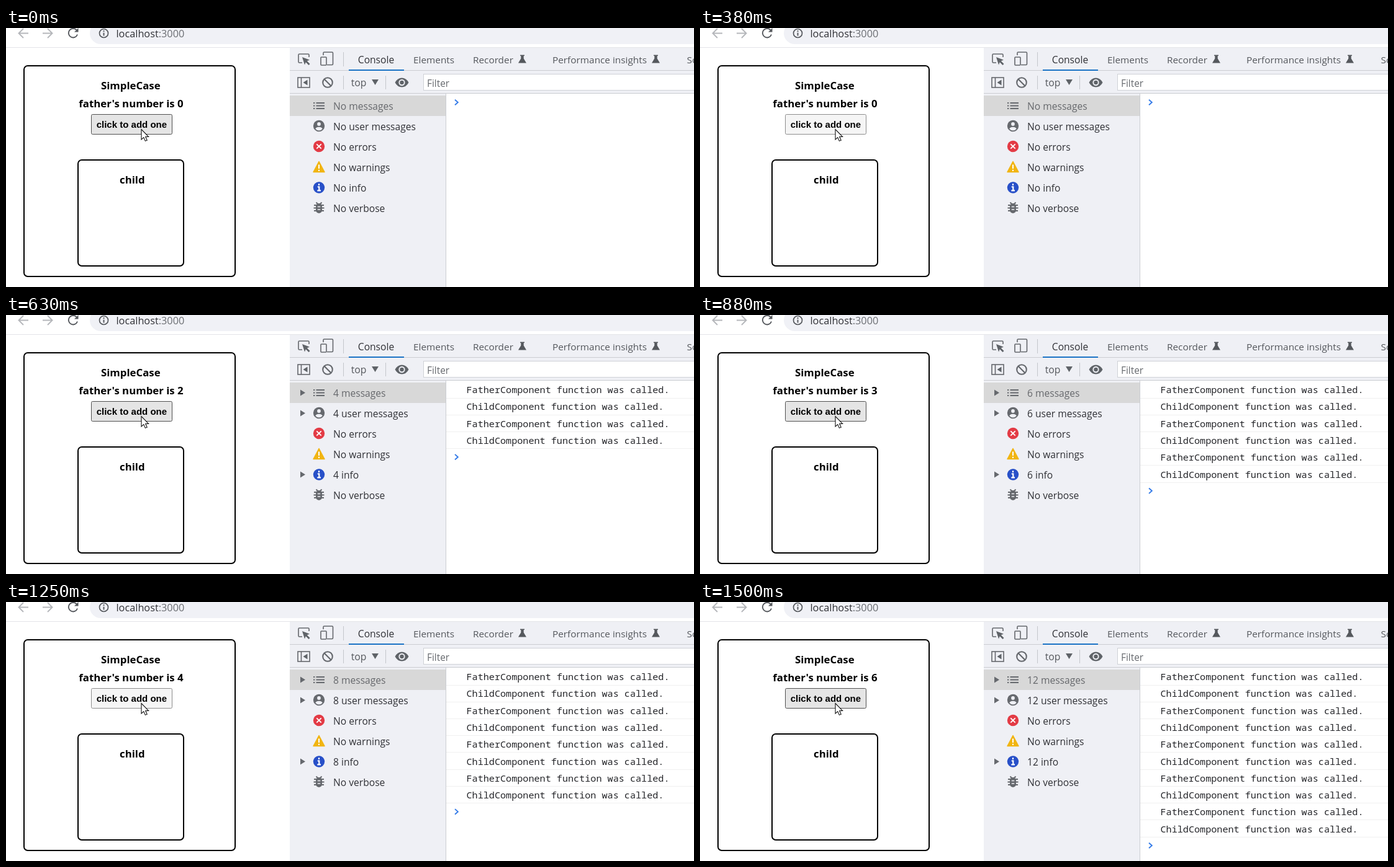
An HTML page for the animation above (1.62 s loop, 1108x418 px).

```html
<!DOCTYPE html>
<html lang="en">
<head>
<meta charset="utf-8">
<title>Click counter with console</title>
<style>
html, body { margin: 0; width: 100%; height: 100%; overflow: hidden; background: #fff; }
svg { display: block; }
text { font-family: "Open Sans", "Noto Sans", sans-serif; font-size: 15.6px; fill: #303136; white-space: pre; }
.tab { font-size: 15.35px; fill: #55585d; }
.bold { font-size: 16.8px; font-weight: 700; fill: #000; }
.mono { font-family: "Noto Sans Mono", "DejaVu Sans Mono", monospace; font-size: 15.15px; fill: #242529; }
.btn { font-family: "Liberation Sans", Arial, sans-serif; font-size: 15px; font-weight: 700; fill: #000; }
.line { fill: none; stroke: #64676c; stroke-width: 1.6; }
</style>
</head>
<body>
<svg width="1108" height="418" viewBox="0 0 1108 418">
  <!-- address bar -->
  <rect width="1108" height="418" fill="#fff"/>
  <rect x="135" y="-9" width="1010" height="35" rx="17.5" fill="#f0f1f6"/>
  <g fill="none" stroke-width="1.9">
    <path d="M36 8.5H21M28 1L20.500 8.500L28 16" stroke="#b5b7bb"/>
    <path d="M59 8.500H74M67 1L74.500 8.500L67 16" stroke="#b5b7bb"/>
    <path d="M113.500 3.200A7.300 7.300 0 1 0 115 10.500" stroke="#55585d"/>
    <circle cx="157.500" cy="8.500" r="7" stroke="#55585d" stroke-width="1.700"/>
    <path d="M157.500 7.500V12.500M157.500 4V6" stroke="#55585d"/>
  </g>
  <path d="M116.500 0V6.500H110Z" fill="#55585d"/>
  <text x="177.500" y="15" style="font-size:16.3px">localhost<tspan fill="#6b6e73">:3000</tspan></text>
  <path d="M0 31.500H1108" stroke="#e3e4e8"/>

  <!-- page -->
  <g fill="#fff" stroke="#000" stroke-width="2">
    <rect x="29" y="61" width="340" height="340" rx="6"/>
    <rect x="116" y="213" width="170" height="171" rx="6"/>
  </g>
  <text class="bold" x="153" y="99">SimpleCase</text>
  <text class="bold" x="117.300" y="128" id="count"></text>
  <text class="bold" x="183" y="251">child</text>
  <rect id="button" x="137.500" y="139.500" width="130" height="32" rx="2"/>
  <text class="btn" x="145.700" y="161">click to add one</text>
  <path d="M218 163.500V180L221.800 176.600L224.300 182.400L227.200 181.200L224.700 175.500H229.600Z" fill="#fff" stroke="#111" stroke-width="1.100"/>

  <!-- panel -->
  <rect x="457" y="32" width="651" height="386" fill="#eff0f5"/>
  <rect x="709" y="106" width="399" height="312" fill="#fff"/>
  <rect x="457" y="109" width="251" height="33" fill="#d8d8d8"/>
  <path d="M457 68.500H1108M457 105.500H1108M708.500 106V418" stroke="#cbcdd2" fill="none"/>
  <path d="M543.500 39V62M543.500 77V99M611.500 77V99" stroke="#c3c6cb"/>
  <rect x="552" y="67" width="89" height="2" fill="#1a73c5"/>
  <rect x="672.500" y="74.500" width="450" height="26" fill="#fff" stroke="#cfd1d6"/>

  <!-- tab row -->
  <path class="line" d="M477 56H472.500Q471 56 471 54.500V43.500Q471 42 472.500 42H486.500Q488 42 488 43.500V47"/>
  <path d="M477 47L489 51.500L484.800 53.300L489.500 58L487.500 60L482.800 55.300L481 59.500Z" fill="#5f6368"/>
  <path class="line" d="M511 44V40.500Q511 39 512.500 39H525Q526.500 39 526.500 40.500V58Q526.500 59.500 525 59.500H517"/>
  <rect class="line" x="507" y="47" width="9" height="13" rx="1"/>
  <text x="566.800" y="57" fill="#303136">Console</text>
  <text class="tab" x="656" y="57">Elements</text>
  <text class="tab" x="752" y="57">Recorder</text>
  <text class="tab" x="880" y="57">Performance insights</text>
  <text class="tab" x="1096.500" y="57">Sources</text>
  <g id="flasks" fill="#55585d"></g>

  <!-- toolbar -->
  <rect class="line" x="470" y="80" width="19" height="16"/>
  <path class="line" d="M475.500 80V96"/>
  <path d="M485.500 83.500V92.500L478.500 88Z" fill="#5f6368"/>
  <circle cx="518" cy="88" r="7.800" class="line" style="stroke-width:2.1"/>
  <path d="M512.500 82.500L523.500 93.500" class="line" style="stroke-width:2.1"/>
  <text x="555.700" y="94" style="font-size:15.8px;fill:#55585d">top</text>
  <path d="M589 83H600L594.500 92Z" fill="#5f6368"/>
  <path d="M626.500 88Q630.500 80.500 637.500 80.500T648.500 88Q644.500 95.500 637.500 95.500T626.500 88Z" fill="#5f6368"/>
  <circle cx="637.500" cy="88" r="4.200" fill="#5f6368" stroke="#eff0f5" stroke-width="1.900"/>
  <text x="678" y="95" style="font-size:15.4px;fill:#66696e">Filter</text>

  <!-- sidebar icons -->
  <path d="M499.500 121H513M499.500 125.500H513M499.500 130H513M495 121H497.300M495 125.500H497.300M495 130H497.300" stroke="#66696e" stroke-width="1.900"/>
  <circle cx="504" cy="158" r="9.200" fill="#66696e"/>
  <circle cx="504" cy="155" r="2.900" fill="#eff0f5"/>
  <path d="M498.300 162.800Q499.500 159.800 504 159.800T509.700 162.800Q507.500 165.500 504 165.500T498.300 162.800Z" fill="#eff0f5"/>
  <circle cx="504" cy="191" r="9.200" fill="#e33b45"/>
  <path d="M500.300 187.300L507.700 194.700M507.700 187.300L500.300 194.700" stroke="#fff" stroke-width="1.900"/>
  <path d="M504 215.500L513 232.500H495Z" fill="#f1b512" stroke="#f1b512" stroke-width="1.500" stroke-linejoin="round"/>
  <path d="M504 220.500V227M504 228.800V231" stroke="#fff" stroke-width="2"/>
  <circle cx="504" cy="257.500" r="9.200" fill="#2850c8"/>
  <path d="M504 251.300V254M501.800 256.300H504.300V262M501.300 262.300H507" stroke="#fff" stroke-width="2.200" fill="none"/>
  <g stroke="#66696e" stroke-width="2">
    <path d="M496 286H512M495.500 290.500H512.500M496 295H512M499.500 281.500L502.500 284.500M508.500 281.500L505.500 284.500" fill="none"/>
    <rect x="500" y="284" width="8" height="14" rx="4" fill="#66696e"/>
  </g>
  <path d="M501.800 288.500H506.200M501.800 293H506.200" stroke="#eff0f5" stroke-width="1.600"/>

  <g id="side"></g>
  <g id="log"></g>
  <path id="prompt" d="M723 -4.300L727.800 0L723 4.300" fill="none" stroke="#347be8" stroke-width="1.900"/>
</svg>
<script>
const LOOP = 1620, PITCH = 27.3, MAX_ROWS = 10;
// [start ms, clicks counted, button held]
const STATES = [
  [0, 0, 0], [130, 0, 1], [500, 1, 1], [630, 2, 0], [750, 2, 1], [880, 3, 0],
  [1000, 3, 1], [1130, 4, 0], [1250, 4, 1], [1380, 5, 1], [1500, 6, 0]
];
const $ = id => document.getElementById(id);

function add(parent, tag, attrs, content = "") {
  const el = document.createElementNS("http://www.w3.org/2000/svg", tag);
  for (const key in attrs) el.setAttribute(key, attrs[key]);
  el.textContent = content;
  parent.appendChild(el);
  return el;
}

for (const x of [831.5, 1046.5])
  add($("flasks"), "path", { d: `M${x - 3.5} 43.500h7v1.600h-1.300v4.200l4.300 7.200h-13l4.300-7.200v-4.200h-1.300z` });

const side = ["messages", "user messages", "errors", "warnings", "info", "verbose"].map((name, i) => {
  const y = 126 + 33 * i;
  return {
    name,
    counts: [0, 1, 4].includes(i),
    label: add($("side"), "text", { x: 527, y: y + 6, style: i ? "" : "fill:#66686c" }),
    arrow: add($("side"), "path", { d: `M474 ${y - 5.5}v10l8-5z`, fill: "#66696e" })
  };
});

const rows = Array.from({ length: MAX_ROWS }, (_, i) => {
  const g = add($("log"), "g", {});
  const y = Math.round(PITCH * i);
  add(g, "text", { class: "mono", x: 741.5, y: 126 + y }, `${i % 2 ? "Child" : "Father"}Component function was called.`);
  add(g, "path", { d: `M709 ${134.5 + y - (i > 1 ? 1 : 0)}H1108`, stroke: "#f0f0f0" });
  return g;
});

const show = (el, on) => el.setAttribute("visibility", on ? "visible" : "hidden");

function draw(ms) {
  const [, clicks, held] = STATES.filter(s => s[0] <= ms).pop();
  const messages = clicks * 2;
  const shown = Math.min(messages, MAX_ROWS);
  $("count").textContent = `father's number is ${clicks}`;
  $("button").setAttribute("fill", held ? "#f5f5f5" : "#e5e5e5");
  $("button").setAttribute("stroke", held ? "#8d8d8d" : "#505050");
  for (const s of side) {
    const on = s.counts && messages > 0;
    s.label.textContent = `${on ? messages : "No"} ${s.name}`;
    show(s.arrow, on);
  }
  rows.forEach((row, i) => show(row, i < shown));
  $("prompt").setAttribute("transform", `translate(0 ${120 + PITCH * shown})`);
}

const start = performance.now();
function tick() {
  draw((performance.now() - start) % LOOP);
  requestAnimationFrame(tick);
}
tick();
</script>
</body>
</html>
```
